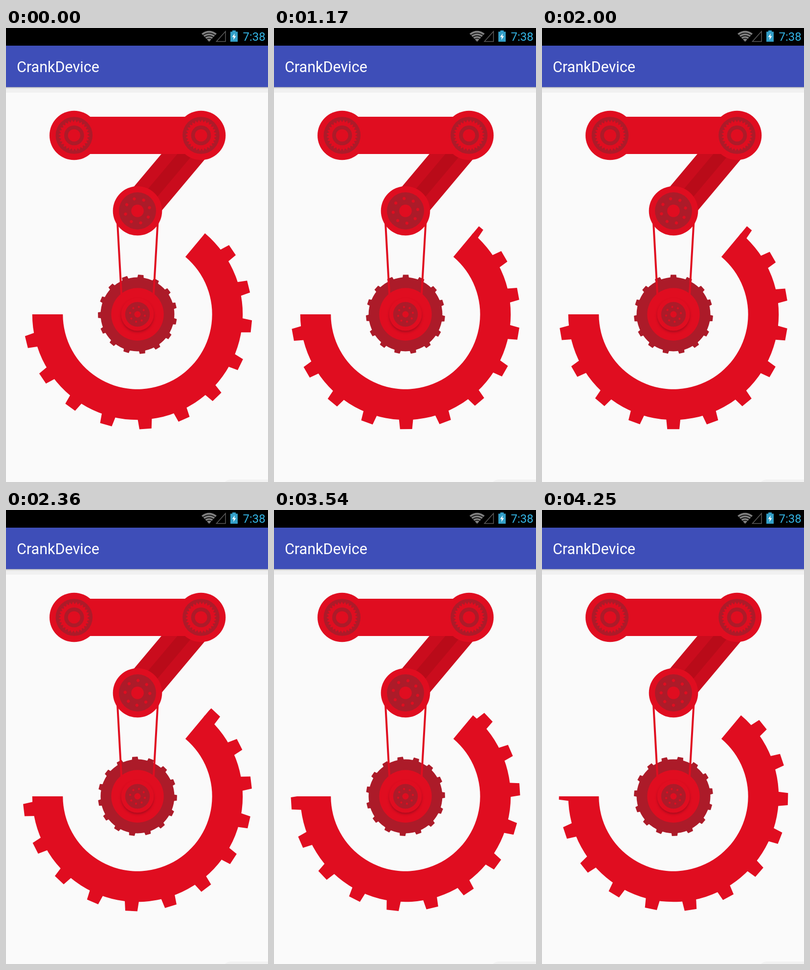
An HTML page that plays this animation: 536x926 px, repeating every 4.35 s.

```html
<!DOCTYPE html>
<html lang="en">
<head>
<meta charset="utf-8">
<title>CrankDevice</title>
<style>
  html, body { margin: 0; width: 100%; height: 100%; overflow: hidden; background: #fafafa; }
  svg { display: block; width: 100vw; height: 100vh; }
  text { font-family: Roboto, "Open Sans", sans-serif; }
  .red { fill: #e00d20; }
  .dark { fill: #ac1b29; }
  .hub { filter: drop-shadow(0 3px 2px rgba(120, 10, 25, .5)); }
</style>
</head>
<body>
<svg viewBox="0 0 536 926">
  <defs>
    <linearGradient id="shade" x2="0" y2="1">
      <stop offset="0" stop-color="#999"/>
      <stop offset=".35" stop-color="#d8d8d8"/>
      <stop offset="1" stop-color="#f1f1f1"/>
    </linearGradient>
    <clipPath id="sector"><path id="wedge"/></clipPath>
    <g id="joint">
      <circle class="red" r="50.3"/>
      <circle class="dark" r="37.8"/>
      <path class="red cog"/>
      <circle class="dark" r="20.3"/>
      <circle class="red" r="12.6"/>
    </g>
  </defs>

  <rect width="536" height="926" fill="#fafafa"/>
  <rect y="120" width="536" height="12" fill="#f1f1f1"/>
  <rect y="120" width="536" height="5" fill="url(#shade)"/>
  <path d="M448 926Q452 921 462 921H536V926Z" fill="#f2f2f2"/>

  <!-- status and app bars -->
  <rect width="536" height="36" fill="#000"/>
  <rect y="36" width="536" height="84.5" fill="#3e4eb8"/>
  <path d="M415.500 28L400 11.500Q415.500 0 431 11.500Z" fill="#808080"/>
  <g fill="none" stroke="#000" stroke-width="1.300">
    <path d="M402 15.500Q415.500 5.500 429 15.500M405.500 19.500Q415.500 12 425.500 19.500M409 23.500Q415.500 18.500 422 23.500"/>
  </g>
  <path d="M449 7V27.500H430.500Z" fill="none" stroke="#5c5c5c" stroke-width="1.500"/>
  <path d="M459 7.500H463V5H470V7.500H474V28H459Z" fill="#339fc8"/>
  <path d="M468 11L462.500 18.500H466L465 24.500L470.500 16.500H467Z" fill="#fff"/>
  <text x="484.500" y="26" font-size="24" fill="#33b5e5">7:38</text>
  <text x="22" y="90" font-size="30.500" fill="#fff">CrankDevice</text>

  <!-- ring gear -->
  <g transform="translate(269 584)">
    <path id="band" class="red"/>
    <g clip-path="url(#sector)"><path id="ring" class="red"/></g>
  </g>

  <!-- wheel -->
  <g transform="translate(269 584)">
    <circle class="dark" r="75.500"/>
    <path id="wheel" class="dark"/>
  </g>
  <path d="M226.700 373L237 560M311.800 373L301 560" stroke="#e00d20" stroke-width="4"/>
  <g transform="translate(269 584)">
    <circle class="red" r="53.700"/>
    <circle class="red hub" r="33.500"/>
    <circle class="dark" r="25.200"/>
    <circle class="red" r="6.500"/>
    <g id="hubDots" class="red"></g>
  </g>

  <!-- arms -->
  <g transform="translate(399 219) rotate(130.170)">
    <rect y="-37.500" width="201.500" height="75" fill="#ca0c1d"/>
    <rect y="-12.500" width="201.500" height="25" fill="#b90b19"/>
  </g>
  <rect class="red" x="139" y="181" width="260" height="76"/>
  <use href="#joint" x="139.300" y="219"/>
  <use href="#joint" x="399" y="219"/>

  <!-- pulley -->
  <g transform="translate(269 373)">
    <circle class="red" r="50.300"/>
    <circle class="dark" r="38"/>
    <circle class="red" r="12.800"/>
    <g id="pulleyDots" class="red"></g>
  </g>
</svg>
<script>
const $ = id => document.getElementById(id);
const cog = document.querySelector(".cog");
const polar = (r, deg) => {
  const a = deg * Math.PI / 180;
  return `${(r * Math.cos(a)).toFixed(2)} ${(r * Math.sin(a)).toFixed(2)}`;
};

// Trapezoid teeth, the first one centred at angle 0.
function teeth(count, base, tip, baseHalf, tipHalf) {
  const deg = (half, r) => Math.asin(half / r) * 180 / Math.PI;
  const b = deg(baseHalf, base), t = deg(tipHalf, tip);
  let d = "";
  for (let i = 0; i < count; i++) {
    const a = i * 360 / count;
    d += `M${polar(base, a - b)}L${polar(tip, a - t)}L${polar(tip, a + t)}L${polar(base, a + b)}Z`;
  }
  return d;
}

function zigzag(count, inner, outer) {
  const points = [];
  for (let i = 0; i < count * 2; i++) points.push(polar(i % 2 ? inner : outer, i * 180 / count));
  return "M" + points.join("L") + "Z";
}

function addDots(group, orbit, r) {
  for (let i = 0; i < 8; i++) {
    const dot = document.createElementNS("http://www.w3.org/2000/svg", "circle");
    const [x, y] = polar(orbit, i * 45).split(" ");
    dot.setAttribute("cx", x);
    dot.setAttribute("cy", y);
    dot.setAttribute("r", r);
    group.append(dot);
  }
}

const CUT = -50.1;
$("wedge").setAttribute("d", `M0 0L${polar(245, CUT)}A245 245 0 1 1 -245 0Z`);
$("band").setAttribute("d",
  `M${polar(215.3, CUT)}A215.300 215.300 0 1 1 -215.300 0H-152.700A152.700 152.700 0 1 0 ${polar(152.7, CUT)}Z`);
$("ring").setAttribute("d", teeth(18, 211, 234.5, 14.8, 12.4));
$("wheel").setAttribute("d", teeth(15, 73, 81, 6.8, 5.6));
cog.setAttribute("d", zigzag(28, 27, 32));
addDots($("pulleyDots"), 25.3, 3.1);
addDots($("hubDots"), 15.3, 2.1);

const LOOP = 4350;
const ticks = [0, 90];
for (const [from, to] of [[240, 700], [820, 1290], [1410, 1880], [2000, 2480],
                          [2600, 3060], [3180, 3650], [3770, 4250]]) {
  for (let i = 0; i < 5; i++) ticks.push(Math.round((from + (to - from) * i / 4) / 10) * 10);
}

// Ring angle over time: slightly uneven speed.
const keys = [[0, 6], [700, -27.7], [1650, -73.4], [2360, -106.9],
              [3060, -141.8], [3540, -164], [4250, -198.6]];
function ringAngle(t) {
  const i = Math.max(1, keys.findIndex(k => k[0] >= t));
  const [t0, a0] = keys[i - 1], [t1, a1] = keys[i];
  return a0 + (a1 - a0) * (t - t0) / (t1 - t0);
}

const turn = (el, deg) => el.setAttribute("transform", `rotate(${deg.toFixed(2)})`);
const start = performance.now();
let shown = -1;

function draw() {
  const t = (performance.now() - start) % LOOP;
  const tick = ticks.filter(k => k <= t).pop();
  if (tick !== shown) {
    shown = tick;
    const ring = ringAngle(tick);
    const wheel = 18 - 1.2 * ring;
    const pulley = 35.7 - 0.953 * ring;
    turn($("ring"), ring);
    turn($("wheel"), wheel);
    turn($("hubDots"), wheel);
    turn($("pulleyDots"), pulley);
    turn(cog, pulley);
  }
  requestAnimationFrame(draw);
}
draw();
</script>
</body>
</html>
```
